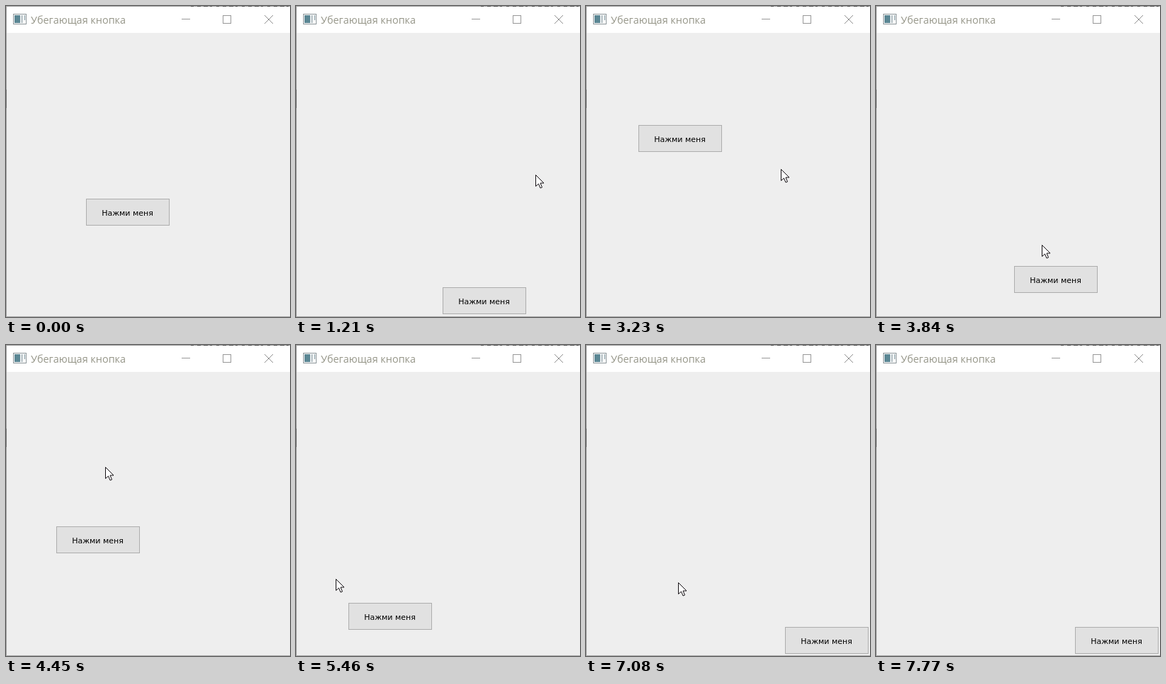
These frames come from a looping animation (401x439 px, 8320 ms). An HTML page with a canvas:

```html
<!DOCTYPE html>
<html lang="ru">
<head>
<meta charset="utf-8">
<title>Убегающая кнопка</title>
<style>
html, body { margin: 0; width: 100%; height: 100%; overflow: hidden; background: #eee; }
canvas { display: block; }
</style>
</head>
<body>
<canvas id="stage" width="401" height="439"></canvas>
<script>
const ctx = document.getElementById('stage').getContext('2d');
const LOOP = 8320, SHOW = 150, HIDE = 7770, STEP = 76;

// The pointer is sampled every STEP ms, counted from the latest of these
const bursts = [150, 1050, 1900, 2760, 3230, 4070, 4700, 5540, 6390, 6540, 7390];

// Pointer path: time, x, y; where it touches the button, also the button's new x, y
const path = [
  [0, 222, 450, 113, 272],
  [450, 168, 358],
  [560, 150, 308, 168, 308],
  [640, 172, 312, 263, 193],
  [970, 312, 278],
  [1120, 342, 229, 207, 397],
  [1200, 339, 238],
  [1650, 215, 228],
  [2128, 278, 368],
  [2210, 275, 398, 177, 351],
  [2370, 150, 380],
  [2520, 180, 355, 248, 230],
  [2980, 272, 266, 74, 168],
  [3060, 275, 230],
  [3230, 275, 230],
  [3530, 188, 198, 195, 367],
  [3920, 246, 374, 135, 128],
  [4000, 246, 376],
  [4220, 103, 232],
  [4370, 138, 165, 71, 256],
  [4450, 140, 172],
  [4850, 132, 258, 133, 209],
  [5070, 185, 245, 46, 262],
  [5230, 150, 275, 74, 364],
  [5460, 56, 330],
  [5610, 78, 368, 229, 102],
  [6310, 284, 141],
  [6390, 281, 148, 224, 198],
  [6690, 288, 199, 13, 315],
  [6850, 298, 280],
  [7070, 130, 335, 281, 398],
  [7310, 126, 365],
  [7690, 99, 361]
];
const jumps = path.filter(p => p.length > 3);

const latest = (list, test) => list.filter(test).pop();

function stepTime(t) {
  const from = latest(bursts, b => b <= t) || 0;
  return from + Math.floor((t - from) / STEP) * STEP;
}

function pointerAt(t) {
  const i = Math.min(path.length - 2, path.filter(p => p[0] <= t).length - 1);
  const [t0, x0, y0] = path[i], [t1, x1, y1] = path[i + 1];
  const k = Math.min(1, (t - t0) / (t1 - t0));
  return [Math.round(x0 + (x1 - x0) * k), Math.round(y0 + (y1 - y0) * k)];
}

function rect(color, x, y, w, h) {
  ctx.fillStyle = color;
  ctx.fillRect(x, y, w, h);
}

function frame(color, x, y, w, h) {
  ctx.strokeStyle = color;
  ctx.lineWidth = 1;
  ctx.strokeRect(x + 0.5, y + 0.5, w - 1, h - 1);
}

function text(str, x, y, font, color, align) {
  ctx.font = font;
  ctx.fillStyle = color;
  ctx.textAlign = align;
  ctx.fillText(str, x, y);
}

function drawWindow() {
  rect('#eeeeee', 0, 0, 401, 439);
  rect('#ffffff', 1, 1, 400, 37);
  rect('#a2a2a2', 0, 0, 401, 1);
  rect('#a2a2a2', 0, 0, 1, 439);
  rect('#a8a8a8', 0, 438, 401, 1);
  rect('#777777', 0, 118, 1, 26);
  // Slivers of text from the window behind
  for (let x = 261; x < 398; x += 9) rect('#555555', x, 0, 3 + x % 4, 1);

  rect('#ffffff', 10, 11, 19, 15);
  frame('#8c9599', 10, 11, 19, 15);
  rect('#5b8794', 12, 13, 8, 11);
  rect('#c3ccd0', 21, 13, 3, 11);
  rect('#78939b', 26, 13, 1, 7);
  text('Убегающая кнопка', 35, 25, '14.4px "Open Sans", "Noto Sans", sans-serif', '#969689', 'left');

  rect('#999999', 248, 18, 12, 1);
  frame('#999999', 306, 13, 12, 12);
  ctx.strokeStyle = '#8f8f8f';
  ctx.beginPath();
  ctx.moveTo(365, 13); ctx.lineTo(377, 25);
  ctx.moveTo(377, 13); ctx.lineTo(365, 25);
  ctx.stroke();
}

function drawButton(x, y) {
  rect('#e1e1e1', x, y, 118, 38);
  frame('#adadad', x, y, 118, 38);
  text('Нажми меня', x + 58.5, y + 24, '11px "DejaVu Sans", sans-serif', '#000000', 'center');
}

const arrow = new Path2D('M.5 .5V16.5L4.5 13L7 19L9.5 18L7 12H12Z');

function drawPointer(x, y) {
  ctx.save();
  ctx.translate(x, y);
  ctx.fillStyle = '#ffffff';
  ctx.fill(arrow);
  ctx.strokeStyle = '#141014';
  ctx.lineWidth = 1;
  ctx.stroke(arrow);
  ctx.restore();
}

function render(now) {
  const t = stepTime(now % LOOP);
  const [, , , x, y] = latest(jumps, j => j[0] <= t);
  drawWindow();
  drawButton(x, y);
  if (t >= SHOW && t < HIDE) drawPointer(...pointerAt(t));
}

const start = performance.now();
function tick() {
  render(Math.max(0, performance.now() - start));
  requestAnimationFrame(tick);
}
tick();
</script>
</body>
</html>
```
